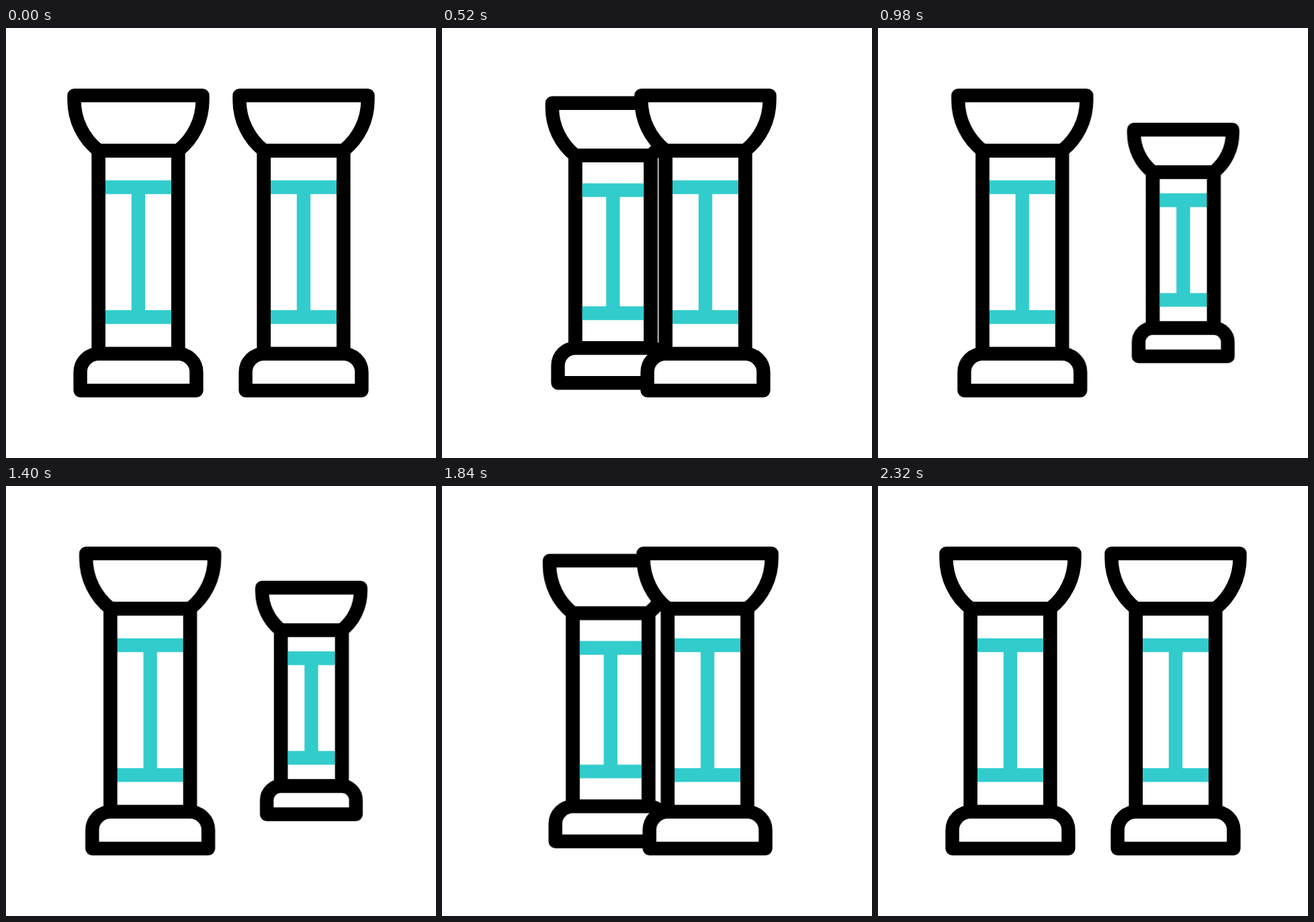
Recreate the animation shown at these times as an HTML page without scripts. Size 640 by 640 pixels, loop 2400 ms.

```html
<!DOCTYPE html>
<html lang="en">
<head>
<meta charset="utf-8">
<title>Two pillars</title>
<style>
  html, body { margin: 0; width: 100%; height: 100%; overflow: hidden; background: #fff; }
  svg { display: block; width: 100%; height: 100%; }

  .line {
    fill: #fff;
    stroke: #000;
    stroke-width: 20.4px;
    stroke-linejoin: round;
    vector-effect: non-scaling-stroke;
  }
  .inlay { fill: none; stroke: #32cccc; }

  .front, .back { animation: 2400ms cubic-bezier(.86, 0, .14, 1) infinite; }
  .front { animation-name: slide-front; }
  .back { animation-name: slide-back; }

  /* Out for 1200 ms, back for 1120 ms, then a short rest. */
  @keyframes slide-front {
    0%, 96.667%, 100% { transform: translate(443px, 320px); }
    50% { transform: translate(210.3px, 320px); }
  }
  @keyframes slide-back {
    0%, 96.667%, 100% { transform: translate(197px, 320px) scale(1); }
    50% { transform: translate(459.3px, 320px) scale(.7635); }
  }
</style>
</head>
<body>
<svg viewBox="0 0 640 640">
  <defs>
    <!-- Pillar centred on the origin -->
    <g id="pillar">
      <path class="line" stroke="none" d="M-59.2-137.5H59.2V164.9H-59.2Z"/>
      <path class="line inlay" d="M-59.2-83H59.2M-59.2 110.2H59.2M0-83V110.2"/>
      <path class="line" style="fill:none" d="M-59.2-137.5V164.9M59.2-137.5V164.9"/>
      <path class="line" d="M-95.5-219.6H95.5V-212.5A95.5 95.5 0 0 1 59.2-137.5H-59.2A95.5 95.5 0 0 1-95.5-212.5Z"/>
      <path class="line" d="M-86.4 219.6V192.2A27.3 27.3 0 0 1-59.1 164.9H59.1A27.3 27.3 0 0 1 86.4 192.2V219.6Z"/>
    </g>
  </defs>
  <g class="back"><use href="#pillar"/></g>
  <g class="front"><use href="#pillar"/></g>
</svg>
</body>
</html>
```
